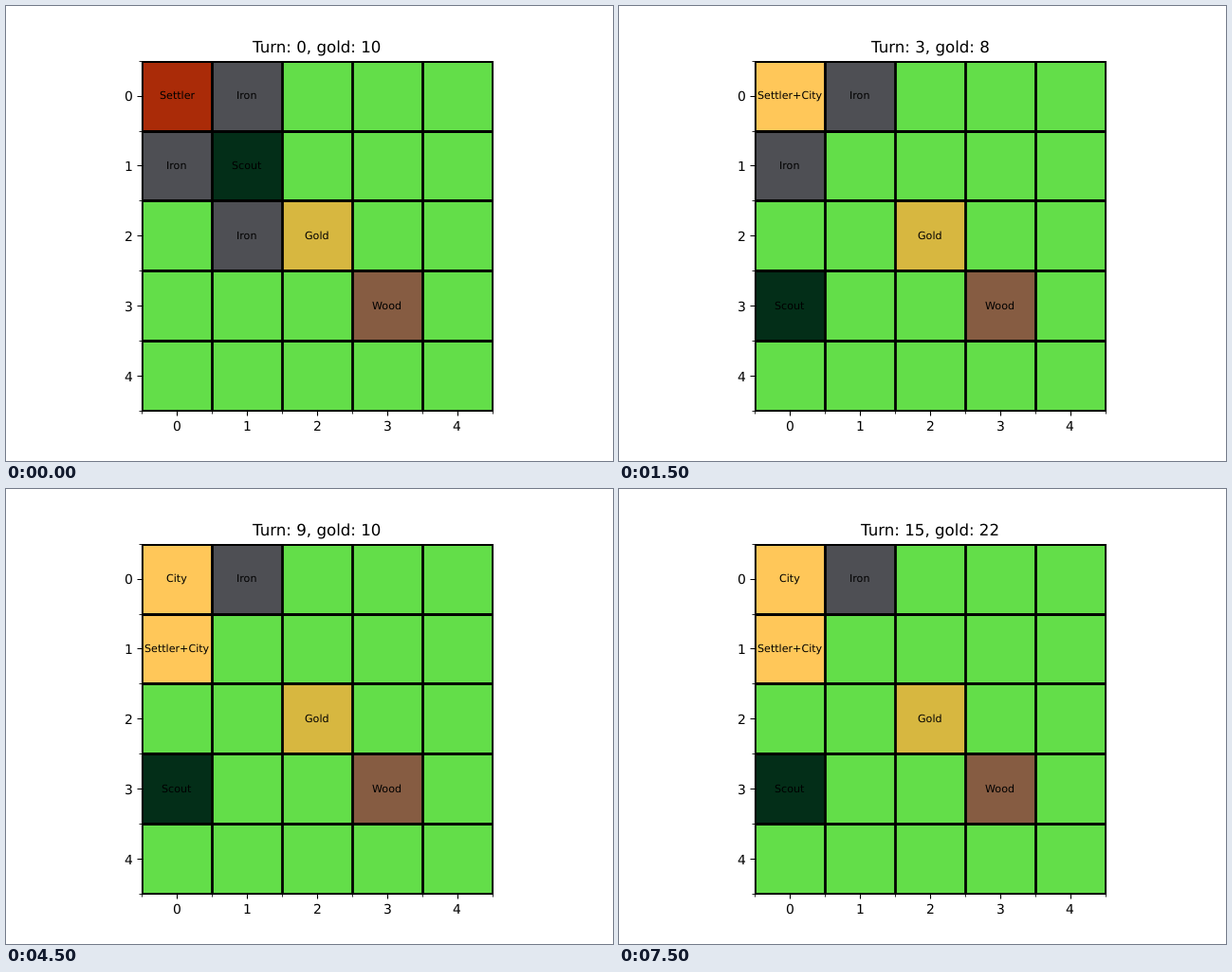
These frames come from a looping animation (640x480 px, 8 s). An HTML page:

```html
<!DOCTYPE html>
<html lang="en">
<head>
<meta charset="utf-8">
<title>Grid game</title>
<style>
  html, body { margin: 0; width: 100%; height: 100%; overflow: hidden; background: #fff; }
  svg { display: block; width: 640px; height: 480px; }
  text { font-family: "DejaVu Sans", sans-serif; fill: #000; text-rendering: geometricPrecision; }
  .title { font-size: 16.667px; }
  .tick { font-size: 13.889px; }
  .label { font-size: 11.111px; }
  path { fill: none; stroke: #000; }
</style>
</head>
<body>
<svg id="stage" viewBox="0 0 640 480">
  <defs><clipPath id="plot"><rect x="143" y="58" width="370" height="369"/></clipPath></defs>
</svg>
<script>
const LEFT = 143.2, TOP = 57.6, CELL = 73.92, N = 5;
const TURN_MS = 500, TURNS = 16;
const COLORS = {
  '': '#63de49', Settler: '#aa2b08', Scout: '#032e18', Iron: '#4e4f54',
  Gold: '#d7b740', Wood: '#865c42', City: '#ffc759', 'Settler+City': '#ffc759'
};

const stage = document.getElementById('stage');

function add(parent, tag, attrs) {
  const el = document.createElementNS('http://www.w3.org/2000/svg', tag);
  for (const key in attrs) el.setAttribute(key, attrs[key]);
  return parent.appendChild(el);
}

// Centre text, then snap its start to a whole pixel.
function setText(el, value, cx) {
  if (el.textContent === value) return;
  el.textContent = value;
  el.setAttribute('x', value ? Math.round(cx - el.getComputedTextLength() / 2) : 0);
}

const plot = add(stage, 'g', { 'clip-path': 'url(#plot)' });
const cells = [];
for (let row = 0; row < N; row++) {
  for (let col = 0; col < N; col++) {
    cells.push({
      row, col,
      rect: add(plot, 'rect', {
        x: LEFT + col * CELL - 0.5, y: TOP + row * CELL - 0.5,
        width: CELL + 1, height: CELL + 1
      })
    });
  }
}

// Grid lines, ticks and frame sit on pixel centres.
const snap = v => Math.floor(v + 0.5) + 0.5;
let grid = '', minor = '', major = '';
for (let i = 0; i <= N; i++) {
  const x = snap(LEFT + i * CELL), y = snap(TOP + i * CELL);
  grid += `M${x} 58V427M143 ${y}H513`;
  minor += `M${x} 427.5V430.5M143.5 ${y}H140.5`;
}
for (let i = 0; i < N; i++) {
  const x = LEFT + (i + 0.5) * CELL, y = TOP + (i + 0.5) * CELL;
  major += `M${snap(x)} 427.5V432.5M143.5 ${snap(y)}H138.5`;
  setText(add(stage, 'text', { class: 'tick', y: 448 }), String(i), x);
  setText(add(stage, 'text', { class: 'tick', y: Math.round(y + 5.5) }), String(i), 129.2);
}
add(plot, 'path', { d: grid, 'stroke-width': 2.778 });
add(stage, 'path', { d: minor, 'stroke-width': 0.833 });
add(stage, 'path', { d: major, 'stroke-width': 1.111 });
add(stage, 'path', { d: 'M143.5 58.5H513.5V427.5H143.5Z', 'stroke-width': 1.111, 'stroke-linejoin': 'miter' });

for (const cell of cells) {
  cell.text = add(stage, 'text', { class: 'label', y: Math.round(TOP + (cell.row + 0.5) * CELL + 3.5) });
}
const title = add(stage, 'text', { class: 'title', y: 49 });

// Keys are row and column digits.
function board(turn) {
  const map = { '01': 'Iron', '10': 'Iron', '22': 'Gold', '33': 'Wood' };
  if (turn < 2) map['21'] = 'Iron';
  map[turn < 2 ? '11' : turn < 3 ? '31' : '30'] = 'Scout';
  map['00'] = turn < 1 ? 'Settler' : turn < 5 ? 'Settler+City' : 'City';
  if (turn >= 5) map['10'] = turn < 9 ? 'Settler' : 'Settler+City';
  return map;
}

// Each city costs 5 and earns 1 per turn.
const gold = turn => turn < 1 ? 10 : turn < 9 ? turn + 5 : 2 * turn - 8;

function draw(turn) {
  const map = board(turn);
  for (const { row, col, rect, text } of cells) {
    const name = map[`${row}${col}`] || '';
    rect.setAttribute('fill', COLORS[name]);
    setText(text, name, LEFT + (col + 0.5) * CELL);
  }
  setText(title, `Turn: ${turn}, gold: ${gold(turn)}`, 328);
}

let shown = -1;
function tick() {
  const turn = Math.floor(performance.now() / TURN_MS) % TURNS;
  if (turn !== shown) draw(shown = turn);
  requestAnimationFrame(tick);
}
tick();
</script>
</body>
</html>
```
